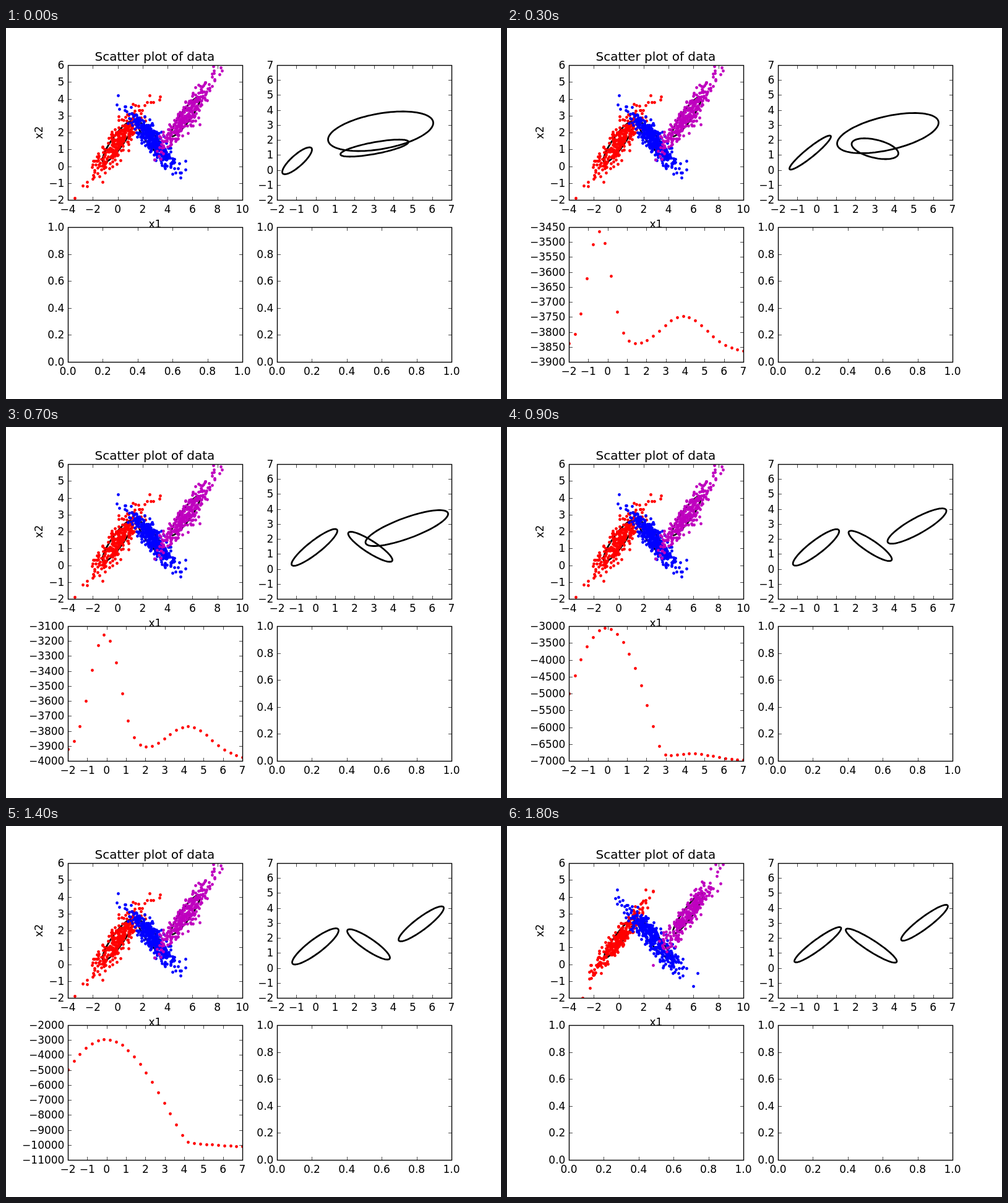
These frames come from a looping animation (800 px wide and 600 px high, 1.9 s). An HTML page with a canvas:

```html
<!DOCTYPE html>
<html>
<head>
<meta charset="utf-8">
<style>
html, body { margin: 0; width: 800px; height: 600px; overflow: hidden; background: #fff; }
canvas { display: block; }
</style>
</head>
<body>
<canvas id="stage" width="800" height="600"></canvas>
<script>
const ctx = document.getElementById('stage').getContext('2d');
const STEP = 100, STEPS = 19, W = 282, H = 218;
const COLORS = ['#ff0000', '#0000ff', '#bf00bf'];
const COUNTS = [280, 380, 280];

// Key poses of the three ellipses: left, right, top, bottom, correlation.
const settled = [[462.5, 537.5, 165.5, 224, .88], [551.5, 620.5, 167, 216, -.88], [634.5, 707.5, 130, 186.5, .9]];
const refit = [[464.5, 540, 163.5, 220.5, .93], [547.5, 630, 166, 221, -.92], [637, 712.5, 127.5, 185.5, .92]];
const poses = [
  [0, [[446.5, 494.5, 193, 236.5, .83], [540.5, 650.5, 180.5, 208, .72], [520.5, 690.5, 135, 199, .42]]],
  [3, [[456.5, 523.5, 174, 229, .94], [557, 632.5, 178.5, 212, -.45], [533.5, 697.5, 137.5, 202.5, .52]]],
  [7, [[461.5, 535.5, 165, 224.5, .9], [553, 624.5, 169.5, 218, -.88], [581, 714.5, 134.5, 192.5, .79]]],
  [14, settled]
];

// Likelihood slice: peak, its place, curvature, sharpness of the floor, floor, second bump, its place.
const slices = [
  [3, [-3465, -.44, 430, 2, -3868, 120, 3.9]],
  [5, [-3275, -.17, 510, 2, -3848, 180, 4]],
  [7, [-3158, -.1, 570, 2, -3992, 220, 4.2]],
  [14, [-2950, -.04, 570, 24, -10105, 190, 4.3]]
];

const mix = (a, b, u) => Array.isArray(a) ? a.map((v, i) => mix(v, b[i], u)) : a + (b - a) * u;

// Linear between keys; the last stretch settles with an ease-out of the given power.
function at(keys, step, power) {
  let i = 0;
  while (i < keys.length - 2 && step > keys[i + 1][0]) i++;
  const [t0, a] = keys[i], [t1, b] = keys[i + 1];
  const u = Math.min(1, (step - t0) / (t1 - t0));
  return mix(a, b, i === keys.length - 2 ? 1 - (1 - u) ** power : u);
}

function likelihood([peak, center, curve, sharp, floor, bump, bumpAt], x) {
  const depth = peak - floor - bump * Math.exp(-((x - bumpAt) ** 2) / 2.9);
  const d2 = (x - center) ** 2, z = curve * d2 / (1 + d2 / 42) / depth;
  return peak - depth * z / (1 + z ** sharp) ** (1 / sharp);
}

function ellipsePoint([x0, x1, y0, y1, r], angle, scale = 1) {
  const c = Math.cos(angle), s = Math.sin(angle);
  return [(x0 + x1) / 2 + scale * (x1 - x0) / 2 * c,
          (y0 + y1) / 2 - scale * (y1 - y0) / 2 * (r * c + Math.sqrt(1 - r * r) * s)];
}

function drawEllipse(e) {
  ctx.beginPath();
  for (let i = 0; i < 100; i++) ctx.lineTo(...ellipsePoint(e, i * Math.PI / 50));
  ctx.closePath();
  ctx.strokeStyle = '#000';
  ctx.lineWidth = 2.78;
  ctx.stroke();
}

function dot(x, y, color) {
  ctx.fillStyle = color;
  ctx.beginPath();
  ctx.arc(Math.round(x) + .5, Math.round(y) + .5, 2.4, 0, 7);
  ctx.fill();
}

function randomizer(seed) {
  return () => (seed = (seed * 16807) % 2147483647) / 2147483647;
}

// The clusters follow the settled ellipses, which mark half of the peak density.
function drawScatter(truth, seed) {
  const sx = x => 100 + W / 7 + (x - 438) * 9 / 14, sy = y => 278 - (278 - y) * 9 / 8;
  const clusters = truth.map(([x0, x1, y0, y1, r]) => [sx(x0), sx(x1), sy(y0), sy(y1), r]);
  const random = randomizer(seed);
  clusters.forEach(drawEllipse);
  clusters.forEach((e, c) => {
    for (let i = 0; i < COUNTS[c]; i++) {
      const radius = Math.sqrt(-2 * Math.log(random())) / 1.177;
      dot(...ellipsePoint(e, random() * 2 * Math.PI, radius), COLORS[c]);
    }
  });
}

function text(str, x, y, align = 'center', size = 17) {
  ctx.font = size + 'px "DejaVu Sans", sans-serif';
  ctx.textAlign = align;
  ctx.fillStyle = '#000';
  ctx.fillText(str, x, y);
}

function line(x0, y0, x1, y1) {
  ctx.beginPath();
  ctx.moveTo(x0, y0);
  ctx.lineTo(x1, y1);
  ctx.stroke();
}

function ticks([min, max, step], place) {
  const n = Math.round((max - min) / step);
  for (let i = 0; i <= n; i++) {
    const label = (min + i * step).toFixed(step < 1 ? 1 : 0).replace('-', '\u2212');
    place(i / n, label);
  }
}

function panel(x, y, xAxis, yAxis, paint) {
  ctx.fillStyle = '#fff';
  ctx.fillRect(x, y, W, H);
  if (paint) {
    ctx.save();
    ctx.beginPath();
    ctx.rect(x, y, W, H);
    ctx.clip();
    paint();
    ctx.restore();
  }
  ctx.strokeStyle = '#000';
  ctx.lineWidth = 1.39;
  ctx.strokeRect(x + .5, y + .5, W, H);
  ctx.lineWidth = .7;
  ticks(xAxis, (u, label) => {
    const tx = Math.round(x + u * W) + .5;
    line(tx, y, tx, y + 6);
    line(tx, y + H, tx, y + H - 5);
    text(label, x + u * W, y + H + 20.5);
  });
  ticks(yAxis, (u, label) => {
    const ty = Math.round(y + H - u * H) + .5;
    line(x, ty, x + 6, ty);
    line(x + W, ty, x + W - 5, ty);
    text(label, x - 5.6, Math.round(y + H - u * H) + 5.5, 'right');
  });
}

// Smallest round step that gives at most nine intervals.
function niceAxis(values) {
  const min = Math.min(...values), max = Math.max(...values);
  const raw = (max - min) / 9, power = 10 ** Math.floor(Math.log10(raw));
  const step = power * [1, 2, 5, 10].find(m => m * power >= raw);
  return [Math.floor(min / step) * step, Math.ceil(max / step) * step, step];
}

function draw(step) {
  const restarted = step === STEPS - 1, unit = [0, 1, .2], wide = [-2, 7, 1];
  ctx.fillStyle = '#fff';
  ctx.fillRect(0, 0, 800, 600);
  panel(100, 60, [-4, 10, 2], [-2, 6, 1], () => restarted ? drawScatter(refit, 5188) : drawScatter(settled, 4211));
  text('Scatter plot of data', 240.4, 53, 'center', 20);
  text('x1', 240.9, 323);
  ctx.save();
  ctx.translate(58.5, 169);
  ctx.rotate(-Math.PI / 2);
  text('x2', 0, 0);
  ctx.restore();
  panel(438, 60, wide, wide, () => (restarted ? refit : at(poses, step, 3)).forEach(drawEllipse));
  if (step === 0 || restarted) {
    panel(100, 322, unit, unit);
  } else {
    const shape = at(slices, step, 2);
    const values = Array.from({ length: 30 }, (_, i) => likelihood(shape, -2 + 9 * i / 29));
    const axis = niceAxis(values);
    panel(100, 322, wide, axis, () => values.forEach((v, i) =>
      dot(100 + i * W / 29, 540 - (v - axis[0]) / (axis[1] - axis[0]) * H, COLORS[0])));
  }
  panel(438, 322, unit, unit);
}

let shown = -1;
const start = performance.now();
function tick() {
  const step = Math.floor((performance.now() - start) / STEP) % STEPS;
  if (step !== shown) draw(shown = step);
  requestAnimationFrame(tick);
}
tick();
</script>
</body>
</html>
```
